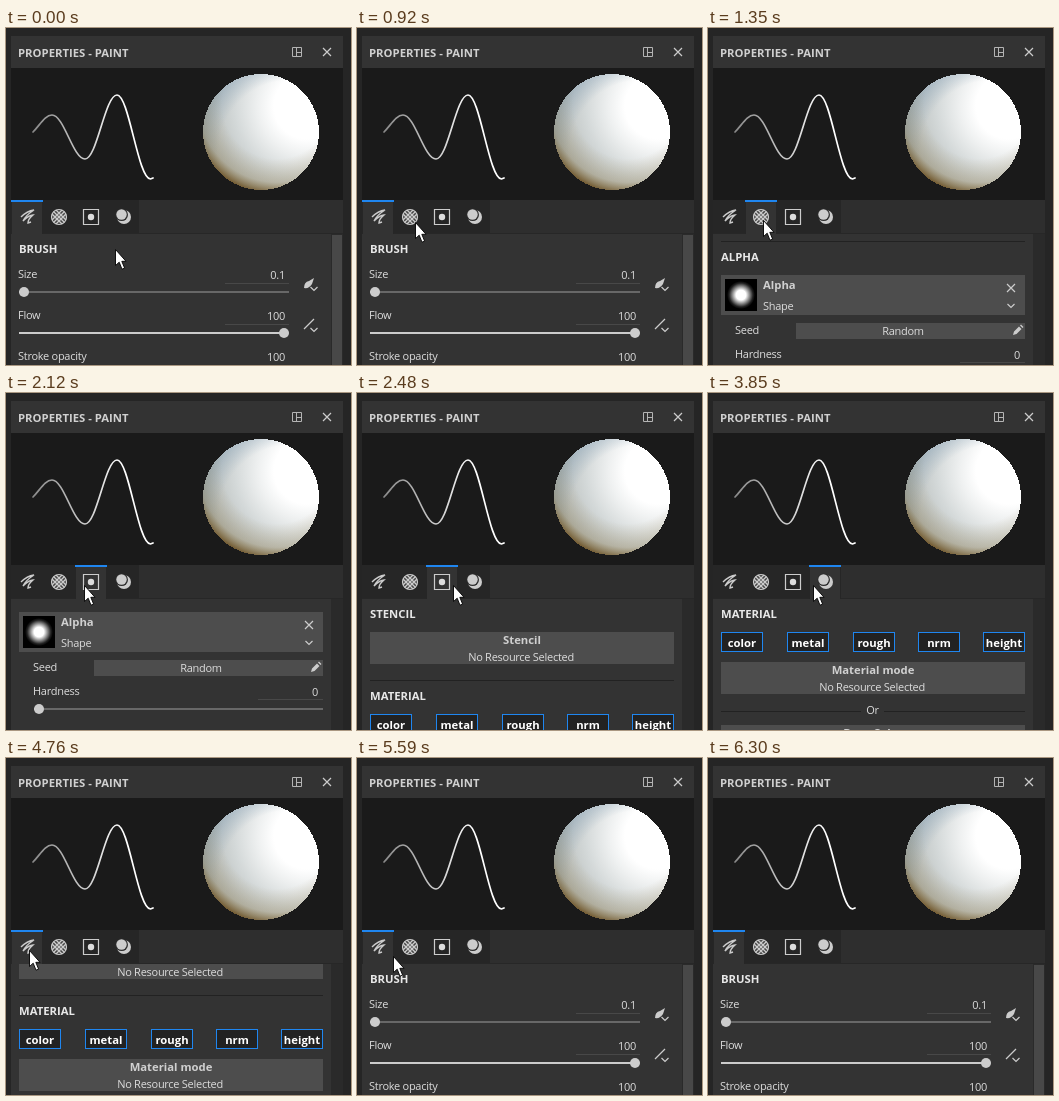
An HTML page for the animation above (6620 ms loop, 345 px wide and 337 px high).

```html
<!DOCTYPE html>
<html lang="en">
<head>
<meta charset="utf-8">
<title>Paint properties</title>
<style>
html, body { margin: 0; width: 100%; height: 100%; overflow: hidden; background: #252525; }
svg { display: block; width: 100vw; height: 100vh; }
text { font: 11px "Open Sans", "Noto Sans", sans-serif; letter-spacing: -.27px; fill: #dcdcdc; }
.b { font-weight: 700; font-size: 11.3px; letter-spacing: 0; fill: #e8e8e8; }
.n { fill: #d0d0d0; }
.btn { fill: #fff; }
.m { text-anchor: middle; }
.e { text-anchor: end; }
.line { fill: none; stroke: #ccc; stroke-width: 1.2; }
</style>
</head>
<body>
<svg id="stage" viewBox="0 0 345 337"></svg>
<script>
const LOOP = 6620;
const stage = document.getElementById('stage');

// Shape helpers
const rect = (x, y, w, h, fill, more = '') =>
  `<rect x="${x}" y="${y}" width="${w}" height="${h}" fill="${fill}" ${more}/>`;
const dot = (x, y, r, fill) => `<circle cx="${x}" cy="${y}" r="${r}" fill="${fill}"/>`;
const text = (x, y, s, cls = '') => `<text x="${x}" y="${y + 4}" class="${cls}">${s}</text>`;
const line = (d, more = '') => `<path class="line" d="${d}" ${more}/>`;
const cross = (x, y) => line(`M${x - 4} ${y - 4}l8 8m0-8l-8 8`);
const chevron = (x, y) => line(`M${x - 3.5} ${y - 2}l3.5 3.5l3.5-3.5`);
const stops = list => list.map(([o, c, a = 1]) =>
  `<stop offset="${o}" stop-color="${c}" stop-opacity="${a}"/>`).join('');
const radial = (id, x, y, r, list) =>
  `<radialGradient id="${id}" gradientUnits="userSpaceOnUse" cx="${x}" cy="${y}" r="${r}">${stops(list)}</radialGradient>`;

const defs = `<defs>
  <clipPath id="view">${rect(5, 206, 332, 131, '#000')}</clipPath>
  <linearGradient id="ink">${stops([[0, '#8a8a8a'], [.5, '#d5d5d5'], [.75, '#fff']])}</linearGradient>
  ${radial('ball', 301, 78, 118, [[0, '#fff'], [.28, '#fff'], [.42, '#eef0f0'], [.62, '#d3d8d8'], [.85, '#b9bebc'], [1, '#a39f92']])}
  ${radial('cool', 285, 125, 104, [[.7, '#7f9bb2', 0], [1, '#7f9bb2', .65]])}
  ${radial('warm', 271, 76, 91, [[.6, '#8a7440', 0], [.86, '#8a7440', .28], [1, '#664a1c', .9]])}
</defs>`;

const ball = ['ball', 'cool', 'warm'].map(g => dot(255, 104, 58, `url(#${g})`)).join('');

const header = rect(5, 8, 332, 32, '#333') + text(12, 25, 'PROPERTIES - PAINT', 'b n') +
  line('M286.5 19.5h9v9h-9zM290.5 19.5v9M290.5 24.5h5', 'style="stroke:#b4b4b4;stroke-width:1"') + cross(321, 24) +
  rect(5, 40, 332, 132, '#1a1a1a') +
  `<path d="M27 104C34 97 39 87 46 87C58 87 67 131 79 131C91 131 99 67 111 67C123 67 132 151 144.500 151L147 150"
    fill="none" stroke="url(#ink)" stroke-width="1.700" stroke-linecap="round"/>
  <g shape-rendering="crispEdges">${ball}</g>`;

// Diagonal checks inside a disc
const checks = [-4, 0, 4].map(d =>
  `M${d - 8} -8l16 16M${d - 8} 8l16-16`).join('');
const checker = `<g transform="translate(53 189)"><clipPath id="disc">${dot(0, 0, 7.5, '#000')}</clipPath>
  ${dot(0, 0, 7.5, '#444')}<g clip-path="url(#disc)">${line(checks, 'style="stroke-width:1.3"')}</g>
  <circle class="line" r="7.5"/></g>`;

const icons =
  line('M15 189Q21 183 28 182Q20 187 17 193Q23 187 27 187Q22 191 22 195L25 194', 'style="stroke-width:1.4"') +
  checker +
  line('M77.5 181.5h15v15h-15z') + dot(85, 189, 3.2, '#ddd') +
  dot(118, 189, 7, '#ccc') + dot(115.7, 186.700, 6.3, '#2c2c2c') + dot(115.5, 186.500, 5.2, '#ccc');

const tabs = rect(5, 172, 332, 33, '#2e2e2e') + rect(5, 205, 332, 1, '#272727') + rect(5, 172, 128, 33, '#262626') +
  `<g id="tab">${rect(5, 172, 32, 34, '#262626')}${rect(6, 172, 30, 34, '#333')}${rect(5, 172, 32, 2, '#1f86f0')}</g>` + icons;

// Scrolling content, laid out from the top of the list
const slider = (x, x2, y, knob) => rect(x, y - 1, x2 - x, 2, '#686868') +
  rect(x, y - 1, knob - x, 2, '#ccc') + dot(knob, y, 5, '#ccc');
const row = ([name, value, pos], i) => {
  const y = 246 + 41 * i;
  return text(12, y, name) + text(279, y + 1, value, 'e') + rect(219, y + 9, 64, 1, '#484848') +
    slider(13, 283, y + 18, 18 + 260 * pos);
};
const rows = [['Size', '0.1', 0], ['Flow', '100', 1], ['Stroke opacity', '100', 1], ['Spacing', '20', .2],
  ['Angle', '0', .5], ['Roundness', '100', 1], ['Size jitter', '0', 0], ['Flow jitter', '0', 0],
  ['Angle jitter', '0', 0], ['Position jitter', '0', 0], ['Smoothing', '0', 0]];
const title = (y, s) => (y > 221 ? rect(13, y - 16, 304, 1, '#222') : '') + text(13, y, s, 'b');
const resource = (y, name) => rect(13, y, 304, 32, '#4d4d4d') + text(165, y + 8, name, 'b n m') +
  text(164, y + 25, 'No Resource Selected', 'm');
const channel = ([name, x]) =>
  rect(x + .5, 964.5, 41, 19, '#222', 'stroke="#1f86f0"') + text(x + 21, 975, name, 'b btn m');
const channels = [['color', 13], ['metal', 79], ['rough', 145], ['nrm', 210], ['height', 275]];

const content = title(221, 'BRUSH') + rows.map(row).join('') +
  '<path d="M298 260Q298 254 303 253L308 250L306 256Q303 261 298 260Z" fill="#ccc"/>' + chevron(308, 261) +
  line('M298 301l10-10') + chevron(308, 302) +
  title(712, 'ALPHA') + rect(13, 730, 304, 40, '#4d4d4d') + rect(17, 734, 32, 32, '#000') +
  dot(33, 750, 14, 'url(#soft)') + text(55, 740, 'Alpha', 'b n') + text(55, 761, 'Shape') +
  cross(303, 743) + chevron(303, 761) +
  text(27, 785, 'Seed') + rect(88, 778, 229, 16, '#4d4d4d') + text(195, 786, 'Random', 'm') +
  '<path d="M305 790l1-3.5l5-5l2.5 2.5l-5 5zM312 780.500l1-1l2.500 2.500l-1 1z" fill="#ccc"/>' +
  text(27, 809, 'Hardness') + text(312, 810, '0', 'e') + rect(252, 817, 65, 1, '#484848') +
  slider(28, 317, 827, 33) +
  title(864, 'STENCIL') + resource(882, 'Stencil') +
  title(946, 'MATERIAL') + channels.map(channel).join('') +
  resource(994, 'Material mode') +
  rect(13, 1043, 140, 1, '#222') + rect(176, 1043, 141, 1, '#222') + text(164.5, 1042, 'Or', 'm') +
  resource(1057, 'Base Color');

stage.innerHTML = defs +
  `<radialGradient id="soft">${stops([[0, '#fff'], [.35, '#fff'], [.62, '#888'], [.85, '#222'], [1, '#000']])}</radialGradient>` +
  rect(0, 0, 345, 337, '#252525') + header + tabs + rect(5, 206, 332, 131, '#333') +
  `<g clip-path="url(#view)">${rect(325, 206, 12, 131, '#2a2a2a')}
    <g id="thumb">${rect(326, 207, 10, 300, '#484848')}</g><g id="list">${content}</g></g>
  <path id="cursor" d="M.5 .5V16.500L4.200 13.200L7 20.200L9.600 19.100L6.800 12.300H11Z" fill="#fff" stroke="#000" stroke-width=".9"/>`;

const [tab, thumb, list, cursor] = ['tab', 'thumb', 'list', 'cursor'].map(id => document.getElementById(id));

// Bursts of movement: start, end, number of steps
const bursts = [[470, 1010, 7], [1190, 1790, 8], [1880, 2540, 9], [2630, 2810, 3],
  [3090, 3330, 4], [3850, 4480, 8], [4760, 5030, 4], [5590, 6210, 8]];
// Tab clicks: time of switch, start of scroll, tab, scroll offset
const clicks = [[1190, 1134.5, 1, 491], [2040, 2041, 2, 643], [3090, 3055.6, 3, 725], [4760, 4700, 0, 0]];
// Pointer: time, x, y
const stopsAt = [[0, 109, 221], [380, 109, 221], [1010, 55, 192], [1430, 55, 192], [1960, 78, 192],
  [2290, 78, 192], [2540, 102, 192], [2810, 112, 192], [3760, 112, 192], [4300, 18, 186],
  [4480, 23, 192], [5500, 23, 192], [6210, 308, 332], [LOOP, 308, 332]];

const clamp = v => Math.min(1, Math.max(0, v));
const smooth = p => p * p * (3 - 2 * p);
const inOut = p => p < .5 ? 4 * p ** 3 : 1 - 4 * (1 - p) ** 3;

function stepTime(t) {
  let out = 0;
  for (const [start, end, n] of bursts) {
    if (t < start) break;
    const gap = (end - start) / (n - 1);
    out = Math.min(end, start + gap * Math.floor((t - start + 12) / gap));
  }
  return out;
}

function draw(t) {
  const s = stepTime(t);
  let active = 0, scroll = 0;
  for (const [at, from, index, offset] of clicks) {
    if (s < at) break;
    active = index;
    scroll += (offset - scroll) * inOut(clamp((s - from) / 270));
  }
  const i = stopsAt.findIndex(k => k[0] > s);
  const [t0, x0, y0] = stopsAt[i - 1], [t1, x1, y1] = stopsAt[i];
  const p = smooth((s - t0) / (t1 - t0));
  const move = (el, x, y) => el.setAttribute('transform', `translate(${Math.round(x)} ${Math.round(y)})`);
  move(tab, active * 32, 0);
  move(list, 0, -scroll);
  move(thumb, 0, scroll * .3);
  move(cursor, x0 + (x1 - x0) * p, y0 + (y1 - y0) * p);
  cursor.style.display = t < 6300 ? '' : 'none';
}

const began = performance.now();
function tick() {
  draw((performance.now() - began) % LOOP);
  requestAnimationFrame(tick);
}
tick();
</script>
</body>
</html>
```
